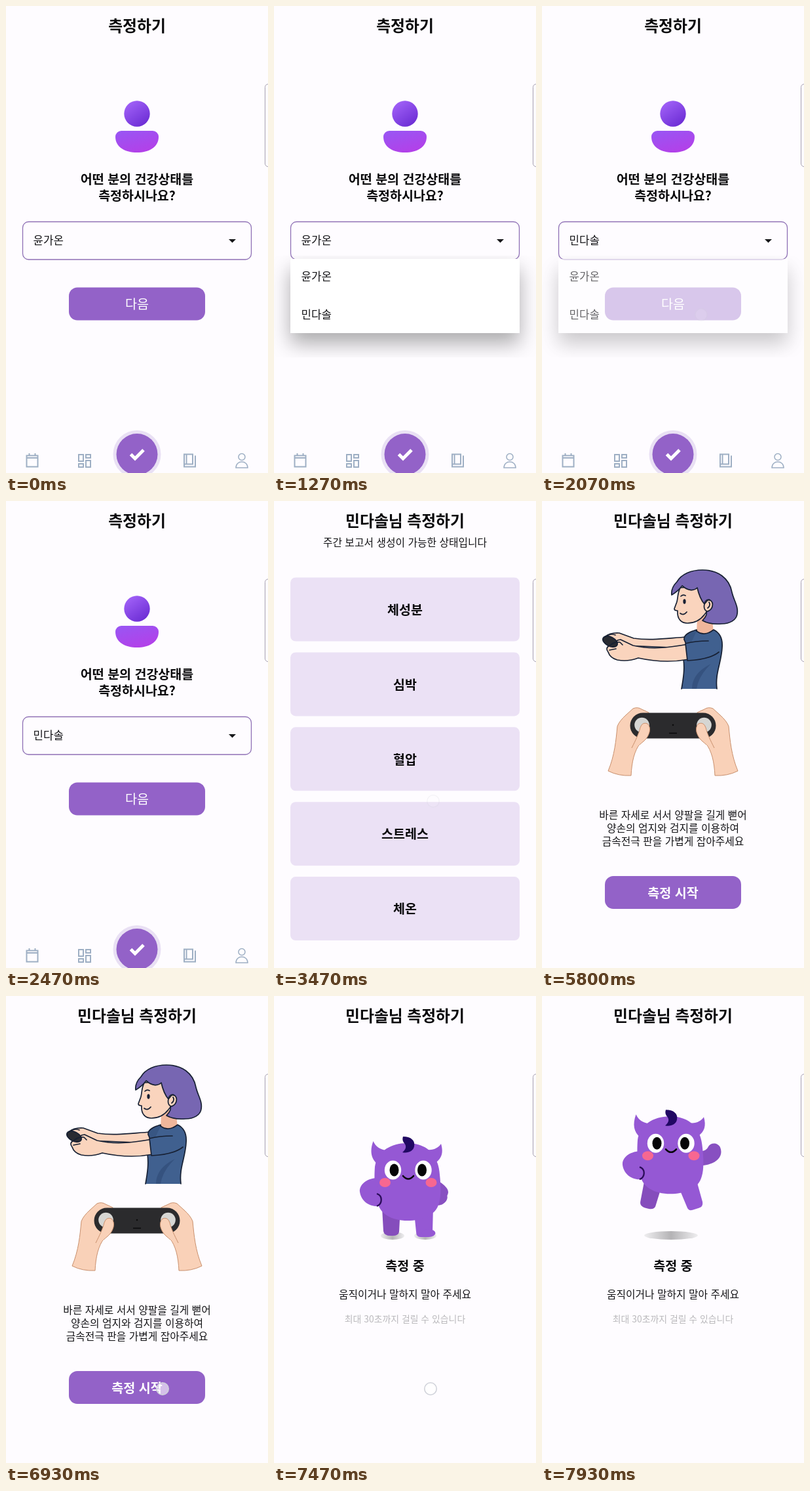
Write an HTML page that moves like this. It is 400x711 px and loops after 8000 ms.

```html
<!DOCTYPE html>
<html lang="ko">
<head>
<meta charset="utf-8">
<style>
html, body { margin: 0; width: 100%; height: 100%; overflow: hidden; background: #fefcff; }
svg { display: block; width: 100vw; height: 100vh; font-family: "Noto Sans CJK KR", "Noto Sans CJK", "Noto Sans", sans-serif; }
.icon { fill: none; stroke: #9eafc4; stroke-width: 2; }
.ink { stroke: #172033; stroke-width: 1.7; stroke-linejoin: round; stroke-linecap: round; }
.line { fill: none; }
.skin { fill: #f9d1b8; stroke: #c9906e; stroke-width: 1; }
</style>
</head>
<body>
<svg id="stage" viewBox="0 0 400 711">
<defs>
  <linearGradient id="head" x1=".1" y1="0" x2=".8" y2="1"><stop stop-color="#a565fa"/><stop offset="1" stop-color="#6a2bd3"/></linearGradient>
  <linearGradient id="torso" x1=".2" y1="0" x2=".7" y2="1"><stop stop-color="#9a55f3"/><stop offset="1" stop-color="#b43fe8"/></linearGradient>
  <linearGradient id="shade"><stop stop-color="#efeef0"/><stop offset=".5" stop-color="#b4b3b5"/><stop offset="1" stop-color="#efeef0"/></linearGradient>
  <filter id="drop" x="-20%" y="-50%" width="140%" height="220%"><feDropShadow dx="0" dy="16" stdDeviation="15" flood-color="#000" flood-opacity=".32"/></filter>
  <clipPath id="menuClip"><rect y="380" width="400" height="155"/></clipPath>
</defs>
</svg>
<script>
const LOOP = 8000, VIOLET = '#9362c8';
const FIRST = '윤가온', SECOND = '민다솔';
const stage = document.getElementById('stage');
const $ = id => document.getElementById(id);

// y is the visual middle of the line
const text = (y, size, str, { x = 200, weight = 400, fill = '#151518', anchor = 'middle', id = '' } = {}) =>
  `<text id="${id}" x="${x}" y="${y + size * 0.37}" font-size="${size}" font-weight="${weight}" fill="${fill}" text-anchor="${anchor}">${str}</text>`;
const bold = (y, size, str) => text(y, size, str, { weight: 700, fill: '#09090b' });
const option = (y, str, id) => text(y, 16.8, str, { x: 41.5, anchor: 'start', id });
const button = (y, str, weight) =>
  `<rect x="96" y="${y}" width="208" height="50" rx="13" fill="${VIOLET}"/>` + text(y + 25.5, 19.6, str, { weight, fill: '#fff' });
const screen = (id, body) =>
  `<g id="${id}"><rect width="400" height="711" fill="#fefcff"/>${body}</g>`;
const mirror = body => body + `<g transform="translate(400 0) scale(-1 1)">${body}</g>`;

const nav = `
  <g class="icon">
    <path d="M31.5 684.5h17v17h-17zM31.5 688h17M35.5 681v4M44.5 681v4"/>
    <path d="M111 683h7v10h-7zM122 683h7v5h-7zM122 692h7v10h-7zM111 697h7v5h-7z"/>
    <path d="M272 682.5h13v15h-13zM275.5 682v15M272 697v4.5h17v-17"/>
    <g stroke-width="1.5"><circle cx="360" cy="686.5" r="5"/><path d="M351 703c0-12 18-12 18 0z"/></g>
  </g>
  <circle cx="200" cy="682.5" r="36.5" fill="#e9e0f4"/>
  <circle cx="200" cy="682.5" r="31.5" fill="${VIOLET}"/>
  <path d="M190.5 682.5l6.5 6.5 13-13" fill="none" stroke="#fff" stroke-width="5"/>`;

const home = `
  ${bold(30, 23.8, '측정하기')}
  <circle cx="200" cy="164" r="19.7" fill="url(#head)"/>
  <path d="M176 190h48a9 9 0 0 1 9 9C233 215 218 223 200 223S167 215 167 199a9 9 0 0 1 9-9z" fill="url(#torso)"/>
  ${bold(264, 19.5, '어떤 분의 건강상태를')}${bold(289, 19.5, '측정하시나요?')}
  <rect x="25.5" y="328.5" width="349" height="57.5" rx="9" fill="none" stroke="#8e70b5" stroke-width="1.3"/>
  ${option(357, FIRST, 'chosen')}
  <path d="M340 355h11l-5.5 5.5z" fill="#18181b"/>
  ${button(428.5, '다음', 500)}${nav}
  <g id="menu" clip-path="url(#menuClip)">
    <rect id="sheet" x="25" y="385" width="350" fill="#fff" filter="url(#drop)"/>
    <g id="options">${option(412, FIRST)}${option(470, SECOND)}</g>
  </g>`;

const title = bold(30, 23.8, SECOND + '님 측정하기');

const list = title + text(63, 15.8, '주간 보고서 생성이 가능한 상태입니다') +
  ['체성분', '심박', '혈압', '스트레스', '체온'].map((name, i) => {
    const y = 116.5 + i * 113.9;
    return `<rect x="25" y="${y}" width="350" height="97" rx="8" fill="#ebe1f5"/>` + bold(y + 49, 19.5, name);
  }).join('');

const woman = `
  <g class="ink">
    <path d="M237 176L236 202Q247 211 262 200L259 172z" fill="#f0b69b" stroke="none"/>
    <path d="M221 207C190 209 166 213 140 209L118 201Q104 200 96 207L98 214 118 221 150 221 222 224z" fill="#fad4bd"/>
    <path d="M236 196C226 199 216 203 217 211L222 222 238 218z" fill="#385683"/>
    <path d="M213 286C216 269 218 256 216 241L236 198Q248 207 262 196C272 201 276 211 275 223C274 246 264 262 267 286z" fill="#40608f" stroke="none"/>
    <path d="M213 286C216 269 218 256 216 241M236 198Q248 207 262 196C272 201 276 211 275 223C274 246 264 262 267 286" class="line"/>
    <path d="M229 286Q229 262 258 248Q239 266 236 286z" fill="#35527f" stroke="none"/>
    <path d="M223 218C190 224 165 226 139 220L120 211Q111 212 113 217L103 220Q96 224 101 230Q104 239 115 242Q131 245 147 239C170 244 198 246 224 241z" fill="#fad4bd"/>
    <path d="M254 213C242 213 230 214 219 217L222 243C241 242 259 239 270 230" fill="#40608f"/>
    <ellipse cx="104" cy="214" rx="12" ry="7" transform="rotate(27 104 214)" fill="#292b32"/>
    <path d="M96 207Q104 201 112 204M103 221Q109 214 119 215L123 219M103 227L113 225" class="line"/>
    <path d="M211 132C206 142 208 150 205 156L202 164Q202 167 207 167C206 180 213 186 222 186C233 186 241 182 248 173L258 160 245 130z" fill="#fad4bd"/>
    <path d="M198 143C197 135 201 128 206 123C213 111 228 105 245 105C268 105 286 117 290 139C293 152 300 160 298 172C297 181 287 187 274 187C262 188 252 186 245 182C251 176 252 172 251 166C259 164 262 153 255 150Q249 150 248 157C242 150 239 141 237 132C231 138 222 136 214 129Q207 138 198 143z" fill="#7766b2"/>
    <path d="M253 151C263 149 263 166 252 168Q246 165 248 157z" fill="#fad4bd"/>
    <path d="M255 154Q258 159 253 163M211 171Q216 175 221 169M212 145Q215 142 219 144" class="line"/>
    <ellipse cx="217.5" cy="153" rx="1.3" ry="2.8" fill="#172033"/>
  </g>`;

const palm = '<path class="skin" d="M101 411C111 387 113 364 115 343Q118 335 128 326L139 316Q146 313 152 317L163 322 156 362 150 369C141 380 137 397 136 418Q117 419 101 411z"/>';
const thumb = `
  <circle cx="152.5" cy="341" r="11.3" fill="#d6d6d3"/>
  <path class="skin" d="M137 376C143 364 148 354 150 345Q153 336 161 339Q166 344 164 352C161 362 156 365 149 371"/>`;
const guide = `
  ${title}${woman}
  ${mirror(palm)}
  <rect x="134.5" y="322.5" width="131" height="39" rx="19.5" fill="#2b2b2d"/>
  <circle cx="200" cy="341" r="1.3" fill="#0c0c0d"/><path d="M194 353.5h12" stroke="#09090a" stroke-width="1.5"/>
  ${mirror(thumb)}
  ${text(478, 15.8, '바른 자세로 서서 양팔을 길게 뻗어')}
  ${text(498, 15.8, '양손의 엄지와 검지를 이용하여')}
  ${text(518, 15.8, '금속전극 판을 가볍게 잡아주세요')}
  ${button(571, '측정 시작', 700)}`;

const eye = (x, pupil) => `<ellipse cx="${x}" cy="265" rx="12.7" ry="14.5" fill="#fff"/><ellipse cx="${pupil}" cy="265" rx="7" ry="9.5"/>`;
const cheek = x => `<ellipse cx="${x}" cy="284" rx="8.5" ry="7" fill="#f76791"/>`;
const monster = `
  <g id="feetShade" fill="url(#shade)"><ellipse cx="181" cy="365" rx="18" ry="6"/><ellipse cx="231" cy="365" rx="17" ry="6"/></g>
  <ellipse id="airShade" cx="197" cy="364.5" rx="41" ry="6.5" fill="url(#shade)"/>
  <g id="monster" fill="#9558d4">
    <path id="armDown" d="M250 280C257 287 266 291 266 299C265 307 258 311 248 311z" fill="#8850c1"/>
    <path id="armUp" d="M246 276C254 278 259 276 262 270C265 264 276 263 280 271C286 285 274 299 246 299z" fill="#8850c1"/>
    <path id="legL" d="M165 322H193L191 359Q190 365 181 365Q168 366 167 358z" fill="#854dbc"/>
    <g id="legR"><path d="M213 320H243L242 360Q241 367 234 367H224Q217 367 217 359z"/><ellipse id="foot" cx="236" cy="361" rx="10.5" ry="6"/></g>
    <path d="M151.5 221C146 236 148 248 158 256L172 235C162 234 155 229 151.5 221zM255 225C259 238 256 248 246 254L234 234C244 235 251 231 255 225z"/>
    <path d="M203 224C235 224 251 243 253 272C255 290 255 305 252 315C247 335 225 342 204 342C180 342 160 332 157 310C153 295 153 275 154 260C157 238 177 224 203 224z"/>
    <path d="M157 277C140 278 130 288 131 298C133 313 146 320 157 320C165 316 165 304 160 300z"/>
    <path d="M157 301C166 304 166 316 157 320" fill="none" stroke="#2a0c58" stroke-width="2.3"/>
    <path d="M197 214C209 214 216 220 214 229C213 236 204 240 196 238C202 233 203 228 198 223C196 220 196 217 197 214z" fill="#210863"/>
    <g fill="#050507">${eye(181.5, 183.5)}${eye(228, 226)}</g>
    ${cheek(169.5)}${cheek(240)}
    <path d="M197 274Q205 283 213 274" fill="none" stroke="#08060c" stroke-width="2.6" stroke-linecap="round"/>
  </g>`;
const measure = `
  ${title}${monster}
  ${bold(411, 19.5, '측정 중')}
  ${text(454, 15.8, '움직이거나 말하지 말아 주세요')}
  ${text(492, 13.9, '최대 30초까지 걸릴 수 있습니다', { fill: '#bab9bc' })}`;

stage.innerHTML += screen('home', home) + screen('list', list) + screen('guide', guide) + screen('measure', measure) + `
  <rect x="395.5" y="119" width="20" height="125.5" rx="4.5" fill="#fefcff" stroke="#a7a1b0"/>
  <circle id="touch" r="9.2" fill="#fff" fill-opacity=".6" stroke="#d0d2da" stroke-width="1.6"/>`;

const ramp = (t, start, length) => Math.min(1, Math.max(0, (t - start) / length));
const easeOut = k => 1 - (1 - k) ** 3;
const set = (id, attrs) => { for (const key in attrs) $(id).setAttribute(key, attrs[key]); };

const changes = { list: 3140, guide: 4670, measure: 7000 };
// start, length, x, y
const taps = [[600, 300, 243, 357], [1800, 300, 243, 470], [3070, 430, 243, 457], [4600, 350, 243, 165], [6930, 740, 239, 598]];

function drawMonster(t) {
  const phase = (t - 7765) / 268;
  const height = 66 * Math.max(0, 1 - phase * phase);
  const air = Math.min(1, height / 40);
  const rest = 1 - air;
  set('monster', { transform: `translate(${-8 * air} ${-height})` });
  set('armDown', { opacity: rest });
  set('armUp', { transform: `translate(${-20 * rest} 0) rotate(${60 * rest} 246 294)` });
  set('legL', { transform: `rotate(${14 * air} 178 320)` });
  set('legR', { transform: `rotate(${-17 * air} 229 320)` });
  set('foot', { opacity: rest });
  set('feetShade', { opacity: rest });
  set('airShade', { opacity: air });
}

function draw(t) {
  for (const id in changes) set(id, { opacity: ramp(t, changes[id], 230) });

  $('chosen').textContent = t < 2000 ? FIRST : SECOND;
  const open = ramp(t, 700, 300);
  set('menu', { opacity: ramp(t, 700, 80) * (1 - ramp(t, 2000, 200)) });
  set('sheet', { height: 113 * easeOut(open) });
  set('options', { opacity: ramp(open, 0.4, 0.6) });

  drawMonster(t);

  const tap = taps.find(([start, length]) => t > start && t < start + length);
  set('touch', { opacity: 0 });
  if (tap) {
    const [start, length, cx, cy] = tap;
    set('touch', { cx, cy, opacity: 1 - ramp(t, start + length - 150, 150) });
  }
}

function tick() {
  draw(performance.now() % LOOP);
  requestAnimationFrame(tick);
}
tick();
</script>
</body>
</html>
```
